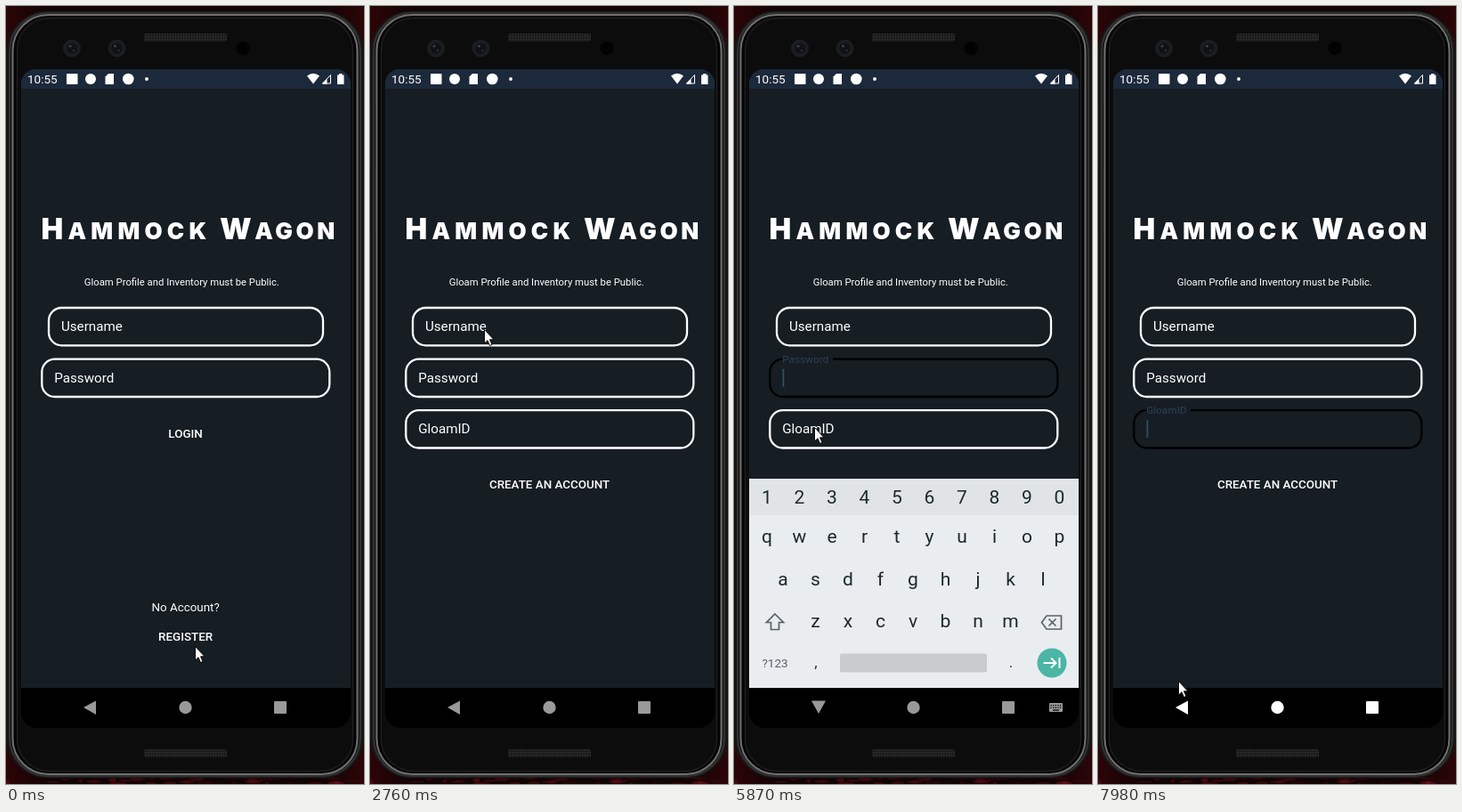
An HTML page that plays this animation: 402x874 px, repeating every 8000 ms.

```html
<!DOCTYPE html>
<html lang="en">
<head>
<meta charset="utf-8">
<title>Sign-up screen</title>
<style>
html, body { margin: 0; width: 100%; height: 100%; overflow: hidden; background: #000; }
svg { display: block; width: 100%; height: 100%; }
text { font-family: Roboto, "Open Sans", sans-serif; white-space: pre; }
.logo { font-family: Inter, Roboto, sans-serif; font-weight: 900; }
</style>
</head>
<body>
<svg viewBox="0 0 402 874">
  <defs>
    <clipPath id="screen"><path d="M17 87a16 16 0 0 1 16-16H371a16 16 0 0 1 16 16V793a18 18 0 0 1-18 18H35a18 18 0 0 1-18-18Z"/></clipPath>
    <pattern id="mesh" width="3" height="3" patternUnits="userSpaceOnUse">
      <rect width="3" height="3" fill="#1c1c1c"/><circle cx="1.5" cy="1.5" r=".8" fill="#363636"/>
    </pattern>
    <linearGradient id="desk" x2="1" y2="0">
      <stop offset="0" stop-color="#2c0508"/><stop offset=".12" stop-color="#120304"/>
      <stop offset=".88" stop-color="#120304"/><stop offset="1" stop-color="#2c0508"/>
    </linearGradient>
  </defs>
  <g id="body"></g>
  <g id="view" clip-path="url(#screen)"></g>
  <g id="mouse"></g>
</svg>
<script>
const LOOP = 8000;
const BG = '#161d23', INK = '#1d292e', GREY = '#596266', WHITE = '#fff', BLUE = '#2b4158';
const $ = id => document.getElementById(id);

// ---- timing: the picture changes only at these moments ----
const bursts = [[130, 520, 4], [1000, 1240, 3], [1610, 1850, 3], [2130, 3130, 8], [3250, 4290, 9],
  [4540, 4780, 3], [5060, 6020, 8], [6170, 7130, 8], [7280, 7700, 4], [7980, 7980, 1]];
const ticks = [0];
for (const [a, b, n] of bursts)
  for (let i = 0; i < n; i++) ticks.push(Math.round(a + (n > 1 ? (b - a) * i / (n - 1) : 0)));

// Linear track of [time, ...values]
function track(keys, t) {
  let i = keys.length - 1;
  while (i > 0 && keys[i][0] > t) i--;
  const a = keys[i], b = keys[i + 1];
  if (!b) return a.slice(1);
  const k = Math.max(0, (t - a[0]) / (b[0] - a[0]));
  return a.slice(1).map((v, j) => v + (b[j + 1] - v) * k);
}

const mousePath = [[0, 212, 719], [520, 202, 707], [1240, 202, 707], [1610, 202, 702], [1730, 213, 566],
  [1850, 223, 472], [1990, 223, 472], [2273, 182, 418], [2559, 137, 372], [2701, 128, 363], [3510, 128, 363],
  [4160, 117, 419], [4920, 117, 419], [5600, 90, 473], [6170, 90, 473], [6880, 90, 760], [7130, 90, 785],
  [7280, 90, 785], [7420, 90, 782], [7700, 90, 782], [7980, 90, 758]];

const fields = [
  { text: 'Username', x: 48, y: 339, w: 308, gap: 119, on: 2844, off: 4540, beat: 3130,
    lift: [[2844, .25], [2987, 1], [4540, 1], [4660, .35], [4780, 0]] },
  { text: 'Password', x: 40.3, y: 396.7, w: 323, gap: 111, on: 4540, off: 6020, beat: 4440,
    lift: [[4540, 0], [4660, .65], [4780, 1], [6020, 1], [6170, .3], [6320, 0]] },
  { text: 'GloamID', x: 40.3, y: 454.2, w: 323, gap: 104, on: 6020, off: 9999, beat: 5980,
    lift: [[6020, 0], [6170, .8], [6320, 1]] }
];

// ---- drawing helpers ----
const rect = (x, y, w, h, fill, rx = 0, more = '') =>
  `<rect x="${x}" y="${y}" width="${w}" height="${h}" rx="${rx}" fill="${fill}" ${more}/>`;
const disc = (x, y, r, fill, more = '') => `<circle cx="${x}" cy="${y}" r="${r}" fill="${fill}" ${more}/>`;
const fill = (d, color) => `<path d="${d}" fill="${color}"/>`;
const line = (d, color, width = 2) => `<path d="${d}" fill="none" stroke="${color}" stroke-width="${width}"/>`;
const text = (s, x, y, size, color = WHITE, more = '') =>
  `<text x="${x}" y="${y}" font-size="${size}" fill="${color}" ${more}>${s}</text>`;
const mid = (s, x, y, size, color, more = '') => text(s, x, y, size, color, 'text-anchor="middle" ' + more);
const button = (s, y) => mid(s, 201.6, y, 13.4, WHITE, 'font-weight="500"');

function logoWord(x, big, rest, gap) {
  return `<text class="logo" x="${x}" y="262" fill="#fff" letter-spacing="${gap}" font-size="33">${big}` +
    `<tspan font-size="26">${rest}</tspan></text>`;
}

// ---- phone ----
function phone() {
  let seed = 7, s = rect(0, 0, 402, 874, 'url(#desk)');
  const rnd = () => (seed = seed * 16807 % 2147483647) / 2147483647;
  for (let i = 0; i < 40; i++) {
    const x = rnd() * 402, y = 866 + rnd() * 8;
    s += `<ellipse cx="${x}" cy="${y}" rx="${2 + rnd() * 8}" ry="${.6 + rnd() * 2}" fill="#7a121a" opacity="${.1 + rnd() * .4}"/>`;
  }
  const shell = (x, y, r, color, stroke, width) =>
    rect(x, y, 402 - 2 * x, 873 - 2 * y, color, r, `stroke="${stroke}" stroke-width="${width}"`);
  s += shell(1, 6.5, 46, '#111', '#161616', 2);
  s += shell(4, 8, 43, '#101010', '#303030', 2.4);
  s += shell(7.5, 10, 40, '#050505', '#707070', 2);
  s += shell(12.5, 13.5, 36, '#0c0c0c', '#1f1f1f', 1.4);
  s += rect(155, 31, 93, 9, 'url(#mesh)', 2) + rect(155, 835, 93, 9, 'url(#mesh)', 2);
  for (const x of [74, 124.5])
    s += disc(x, 47.5, 10, '#1c1d1f') + disc(x, 47.5, 6, '#101114') + disc(x - 2, 45, 1.6, '#3c4046') + disc(x + 2, 50, 1.2, '#303338');
  return s + disc(266, 47.5, 7.5, '#020202');
}

// ---- app windows ----
function field(f, t) {
  const r = 14.5, h = 42.3, { x, y, w } = f;
  const focus = t >= f.on && t < f.off;
  const k = t < f.on ? 0 : track(f.lift, t)[0];
  const tx = x + 14.2;
  const left = x + r, right = focus ? f.gap : left;
  const edge = `M${right} ${y}H${x + w - r}a${r} ${r} 0 0 1 ${r} ${r}V${y + h - r}a${r} ${r} 0 0 1 ${-r} ${r}` +
    `H${x + r}a${r} ${r} 0 0 1 ${-r} ${-r}V${y + r}a${r} ${r} 0 0 1 ${r} ${-r}${focus ? '' : 'Z'}`;
  let s = line(edge, focus ? '#000' : WHITE, 2.3);
  if (focus && Math.floor((t - f.beat) / 500) % 2 === 0) s += rect(tx, y + 11, 1.8, 20, '#2f4d6b');
  return s + text(f.text, tx - .3, y + 26 - 22 * k, 15.2 - 3.8 * k, focus && k > 0 ? BLUE : WHITE,
    `letter-spacing="${.25 * k}"`);
}

function appWindow(register, t) {
  let s = rect(17, 71, 370, 740, '#000') + rect(17, 71, 370, 695, BG) + rect(17, 71, 370, 22, '#1c293b');
  s += logoWord(39.5, 'H', 'AMMOCK', 5.2) + logoWord(240, 'W', 'AGON', 3.6);
  s += text('Gloam Profile and Inventory must be Public.', register ? 88.7 : 87.8, 314, 11.3);
  s += field(fields[0], t) + field(fields[1], t);
  return s + (register
    ? field(fields[2], t) + button('CREATE AN ACCOUNT', 542)
    : button('LOGIN', 484.6) + mid('No Account?', 201.6, 679.6, 13.4, WHITE) + button('REGISTER', 712.6));
}

function scaled(s, k, alpha = 1) {
  return `<g opacity="${alpha}" transform="translate(202 441) scale(${k}) translate(-202 -441)">${s}</g>`;
}

function windows(t) {
  if (t < 1000) return appWindow(false, t);
  if (t >= 1240) return appWindow(true, t);
  const p = t < 1120 ? .3 : .95;
  return scaled(appWindow(false, t), 1 + .15 * p) + scaled(appWindow(true, t), .85 + .15 * p, t < 1120 ? .4 : 1);
}

function statusBar() {
  return text('10:55', 24, 87, 13.5) + rect(68, 76, 12.5, 12, WHITE, 1) + disc(95, 82, 6, WHITE) +
    fill('M115 76h6v12h-9.5v-8.5z', WHITE) + disc(137.3, 82, 6.3, WHITE) + disc(158, 82, 1.9, WHITE) +
    fill('M338 78.5Q345 73 352 78.5L345 87.5Z', WHITE) +
    line('M355.5 87H364.5V77.5Z', WHITE, 1) + fill('M355 87.5L360.5 82V87.5Z', WHITE) +
    fill('M372 77.5h2v-1.5h3.5v1.5h2v10.5h-7.5z', WHITE);
}

function navBar(t) {
  const color = t >= 7420 ? WHITE : t >= 7130 ? '#bcbcbc' : '#999';
  const down = t >= 3130 && t < 7560;
  const glow = t < 7280 ? 0 : track([[7280, 1], [7700, 0]], t)[0];
  let s = rect(52, 766, 86, 44.5, '#2a2a2a', 22, `opacity="${glow}"`);
  s += fill(down ? 'M87 780.5H103L95 795Z' : 'M87 788L101 780.5V796Z', color);
  s += disc(201.5, 788, 7.2, color) + rect(301, 781, 14, 14, color, 1);
  if (down) {
    s += rect(354, 783, 15, 10, '#999', 1);
    for (let i = 0; i < 10; i++) s += rect(355.5 + i % 5 * 2.6, i < 5 ? 785 : 787.6, 1.3, 1.3, '#000');
    s += rect(358, 790.4, 7, 1.3, '#000');
  }
  return s;
}

// ---- keyboard ----
const KEY = 36.5;
function keyRow(letters, x, y) {
  return [...letters].map((c, i) => mid(c, x + i * KEY, y, 21, INK)).join('');
}

function toolStrip() {
  let s = disc(38.5, 552, 14.5, '#c9cdd0') + disc(38.5, 551, 14, WHITE) + line('M41 546.5L36.5 551L41 555.5', GREY, 1.8);
  s += disc(86, 549.5, 5, 'none', `stroke="${GREY}" stroke-width="2"`) + line('M89.5 553L96 559.5', GREY, 2.2);
  s += line('M135.5 544.5H147.5Q148.5 544.5 148.5 545.5V553L143 558.5H135.5Q134 558.5 134 557V546Q134 544.5 135.5 544.5ZM148.5 553H143V558.5', GREY, 1.7);
  s += disc(138.5, 549, 1.1, GREY) + disc(144, 549, 1.1, GREY) + line('M137.5 552.5Q141 556 144 552.5', GREY, 1.3);
  s += mid('GIF', 194.5, 555.5, 12.5, GREY, 'font-weight="900" letter-spacing=".7"');
  s += rect(242, 543.5, 15, 15, GREY, 1.5) + rect(282, 541, 1, 21, '#c6cacd');
  for (const x of [309.5, 315.8, 322]) s += disc(x, 551.5, 1.9, GREY);
  return s + rect(365.5, 543, 5, 10, GREY, 2.5) + line('M362.5 550.5a5.5 5.5 0 0 0 11 0M368 556V559.5', GREY, 1.6);
}

function keyboard(t) {
  const [dy, alpha] = track([[3250, 2, .94], [3380, 0, 1], [7280, 0, 1], [7420, 14, .55], [7560, 40, 0]], t);
  if (t < 3250 || !alpha) return '';
  const digits = t >= 4660 && t < 6020;
  let s = rect(17, 531, 370, 235, '#e9edf0') + rect(17, 531, 370, 41, '#e0e4e7');
  s += keyRow('qwertyuiop', 37, 603) + keyRow('asdfghjkl', 55, 651) + keyRow('zxcvbnm', 91.5, 698);
  s += line('M46 683L55.5 692.5H50.5V700.5H41.5V692.5H36.5Z', GREY, 1.7);
  s += line('M351 685H367.5V700H351L345.5 692.5ZM353.5 688.5L361.5 696.5M361.5 688.5L353.5 696.5', GREY, 1.7);
  s += mid('?123', 46, 743, 13.5, GREY) + mid(',', 92, 743, 17, INK) + mid('.', 311, 743, 17, INK);
  s += disc(357, 738, 16.5, '#4bb5a6');
  if (digits) {
    s += keyRow('1234567890', 37, 559) + rect(119, 727.5, 165, 21, '#c8cccf', 2);
    s += line('M347.5 738H361M356 732.5L361.5 738L356 743.5M365.5 732V744', WHITE, 2);
  } else {
    s += toolStrip();
    [...'1234567890'].forEach((c, i) => s += mid(c, 48 + i * KEY, 588, 9.3, GREY));
    s += disc(127.8, 738, 8.6, 'none', `stroke="${GREY}" stroke-width="1.8"`);
    s += disc(125, 735.8, 1.3, GREY) + disc(130.6, 735.8, 1.3, GREY) + fill('M123 740H132.5Q131 744 127.8 744T123 740Z', GREY);
    s += rect(155, 727.5, 129, 21, '#c8cccf', 2);
    s += line('M365.5 733.5V738.5H349.5M353.5 734L349 738.5L353.5 743', WHITE, 2);
  }
  return `<g transform="translate(0 ${dy})" opacity="${alpha}">${s}</g>`;
}

// ---- playback ----
let shown = -1;
function draw(t) {
  if (t === shown) return;
  shown = t;
  $('view').innerHTML = windows(t) + statusBar() + navBar(t) + keyboard(t);
  const [x, y] = track(mousePath, t);
  $('mouse').innerHTML = `<path transform="translate(${x} ${y})" d="M.5 .5V16L4 12.7L6.5 18.5L9 17.4L6.5 11.8H11Z" fill="#fff" stroke="#000" stroke-width=".9"/>`;
}

$('body').innerHTML = phone();
const start = performance.now();
function frame() {
  const now = (performance.now() - start) % LOOP;
  draw(ticks.filter(k => k <= now).pop());
  requestAnimationFrame(frame);
}
frame();
</script>
</body>
</html>
```
